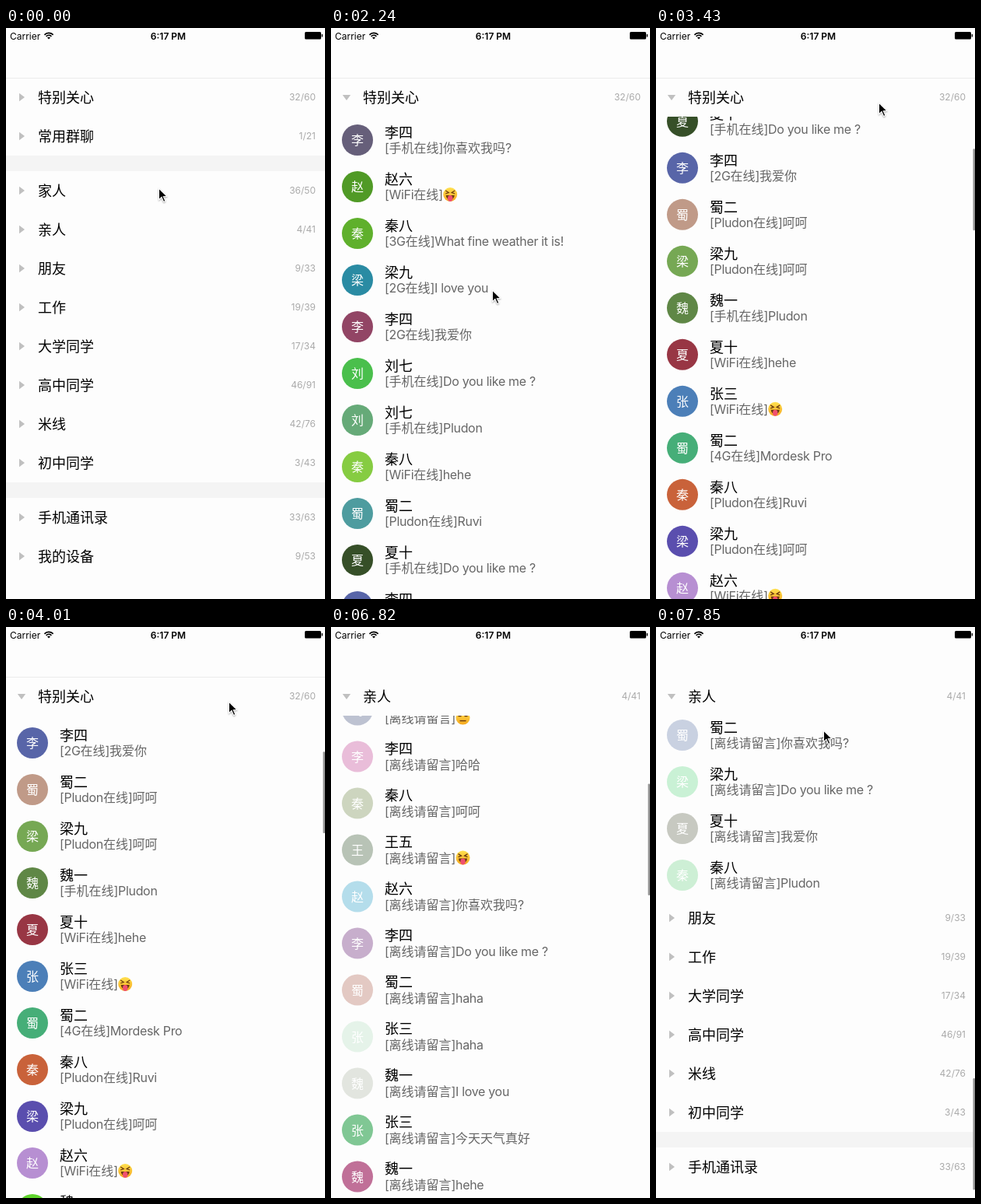
Recreate the animation shown at these times as an HTML page with a canvas. Size 410 by 734 pixels, loop 8 s.

```html
<!DOCTYPE html>
<html lang="zh-CN">
<head>
<meta charset="utf-8">
<title>Contacts</title>
<style>
html, body { margin: 0; width: 100%; height: 100%; overflow: hidden; background: #fdfdfd; }
canvas { display: block; width: 410px; height: 734px; }
</style>
</head>
<body>
<canvas id="stage"></canvas>
<script>
const W = 410, H = 734, TOP = 64, HEAD = 50, CELL = 60, LOOP = 8000;
const BG = '#fdfdfd', GAP = '#f4f4f4';
const FONT = "Inter, 'Noto Sans CJK SC', 'Noto Sans CJK', sans-serif";
const canvas = document.getElementById('stage');
const ctx = canvas.getContext('2d');
const dpr = window.devicePixelRatio || 1;
canvas.width = W * dpr;
canvas.height = H * dpr;

// name, presence ('-' is offline), message, colour; @1 and @2 are faces
const parse = s => s.trim().split('\n').map(l => l.trim().split('|'));
const starred = parse(`
  李四|手机|你喜欢我吗?|#665f7a
  赵六|WiFi|@1|#509a26
  秦八|3G|What fine weather it is!|#5fb02c
  梁九|2G|I love you|#2a8ba3
  李四|2G|我爱你|#924565
  刘七|手机|Do you like me ?|#4abf4c
  刘七|手机|Pludon|#66aa78
  秦八|WiFi|hehe|#86cc42
  蜀二|Pludon|Ruvi|#4e9c9f
  夏十|手机|Do you like me ?|#364f28
  李四|2G|我爱你|#5865a8
  蜀二|Pludon|呵呵|#c09a88
  梁九|Pludon|呵呵|#76a854
  魏一|手机|Pludon|#5f8746
  夏十|WiFi|hehe|#983644
  张三|WiFi|@1|#4c7fb8
  蜀二|4G|Mordesk Pro|#46ae78
  秦八|Pludon|Ruvi|#c9623a
  梁九|Pludon|呵呵|#5a4eae
  赵六|WiFi|@1|#b78fd2
  魏一|手机|哈哈|#5fd42c`);
const family = parse(`
  张三|2G|我爱你|#6c86c2
  梁九|WiFi|@1|#66b0c0
  王五|Pludon|呵呵|#641c7c
  李四|3G|What fine weather it is!|#3a88d2
  蜀二|-|我爱你|#6a76d8
  赵六|-|呵呵|#9862a8
  秦八|-|今天天气真好|#6f776c
  蜀二|-|@2|#5d6a8f
  李四|-|哈哈|#ca5ca2
  秦八|-|呵呵|#849861
  王五|-|@1|#526b4d
  赵六|-|你喜欢我吗?|#48accf
  李四|-|Do you like me ?|#753982
  蜀二|-|haha|#bb7a6b
  张三|-|haha|#c0e3ca
  魏一|-|I love you|#b9c0b1
  张三|-|今天天气真好|#31a552
  魏一|-|hehe|#b55786`);
const familyEnd = parse(`
  蜀二|-|你喜欢我吗?|#7a8eb6
  梁九|-|Do you like me ?|#7ade98
  夏十|-|我爱你|#757a66
  秦八|-|Pludon|#84d998`);

let seed = 7;
const rnd = n => (seed = seed * 16807 % 2147483647) % n;
const names = '魏一 蜀二 张三 李四 王五 赵六 刘七 秦八 梁九 夏十'.split(' ');
const words = ['呵呵', '哈哈', 'hehe', 'haha', '我爱你', '今天天气真好', 'I love you', '@1', '@2'];
const filler = () => [names[rnd(10)], '-', words[rnd(words.length)],
  `rgb(${40 + rnd(170)},${40 + rnd(170)},${40 + rnd(170)})`];
const fill = (rows, n, end = []) => {
  while (rows.length + end.length < n) rows.push(filler());
  return rows.concat(end);
};

const sections = [
  ['特别关心', '32/60'], ['常用群聊', '1/21', 20],
  ['家人', '36/50'], ['亲人', '4/41'], ['朋友', '9/33'], ['工作', '19/39'],
  ['大学同学', '17/34'], ['高中同学', '46/91'], ['米线', '42/76'], ['初中同学', '3/43', 20],
  ['手机通讯录', '33/63'], ['我的设备', '9/53']
].map(([title, count, gap = 0]) => ({ title, count, gap, rows: [] }));
sections[0].rows = fill(starred, 60);
sections[3].rows = fill(family, 41, familyEnd);

// --- motion ---
const clamp = v => Math.max(0, Math.min(1, v));
const ramp = (t, a, b) => clamp((t - a) / (b - a));
const smooth = k => k * k * (3 - 2 * k);
const ease = (t, a, b) => smooth(ramp(t, a, b));
const drag = (t, a, b, p) => Math.pow(ramp(t, a, b), p);
const glide = (t, a, b, tau) =>
  (1 - Math.exp(-(Math.max(a, Math.min(b, t)) - a) / tau)) / (1 - Math.exp(-(b - a) / tau));

function openness(t) {
  return [ease(t, 1350, 1640) - ease(t, 5190, 5390), 0, 0, ease(t, 5430, 5640)];
}

function scrollAt(t) {
  if (t < 5800)
    return (259 * drag(t, 2240, 2690, 1.75) + 336 * glide(t, 2690, 4010, 335)) * (1 - ease(t, 5190, 5390));
  return 480 * drag(t, 6200, 6500, 1.3) + 175 * glide(t, 6500, 7000, 240)
    + 740 * drag(t, 7000, 7250, 1.5) + 1000 * glide(t, 7250, 7850, 250);
}

const path = [
  [0, 196, 205], [300, 196, 205], [900, 215, 104], [1700, 215, 104], [2200, 207, 336],
  [2240, 207, 336], [2690, 284, 77], [2830, 287, 110], [3200, 286, 95], [4250, 286, 95],
  [4460, 275, 97], [4620, 275, 97], [4760, 240, 132], [4900, 207, 97], [5200, 207, 97],
  [5430, 166, 270], [5640, 166, 270], [5930, 165, 281], [5960, 165, 281], [6200, 190, 640],
  [6500, 205, 160], [6800, 215, 745], [7000, 215, 760], [7250, 212, 20], [7800, 215, 132], [LOOP, 215, 132]
];
function cursorAt(t) {
  const i = Math.max(1, path.findIndex(p => p[0] > t));
  const [t0, x0, y0] = path[i - 1], [t1, x1, y1] = path[i];
  const k = ease(t, t0, t1);
  let y = y0 + (y1 - y0) * k;
  if (t0 === 2240) y = y0 - scrollAt(t);
  if (t0 === 7000) y = y0 + (y1 - y0) * drag(t, t0, t1, 1.5);
  return [x0 + (x1 - x0) * k, y];
}

// --- drawing ---
function rect(x, y, w, h, color) {
  ctx.fillStyle = color;
  ctx.fillRect(x, y, w, h);
}
function disc(x, y, r, color) {
  ctx.fillStyle = color;
  ctx.beginPath();
  ctx.arc(x, y, r, 0, 7);
  ctx.fill();
}
function poly(pts, color) {
  ctx.beginPath();
  pts.forEach(([x, y]) => ctx.lineTo(x, y));
  ctx.closePath();
  ctx.fillStyle = color;
  ctx.fill();
}
function text(s, x, y, size, color, align = 'left', weight = 400) {
  ctx.font = `${weight} ${size}px ${FONT}`;
  ctx.textAlign = align;
  ctx.fillStyle = color;
  ctx.fillText(s, x, y);
}
// Latin runs are tracked a little tighter than Chinese ones
function mixed(s, x, y, size, color) {
  for (const run of s.match(/[\u3000-\u9fff]+|[^\u3000-\u9fff]+/g) || []) {
    ctx.letterSpacing = run.charCodeAt(0) < 0x3000 ? '-0.32px' : '0px';
    text(run, x, y, size, color);
    x += ctx.measureText(run).width;
  }
  ctx.letterSpacing = '0px';
  return x;
}

function line(pts, color, width) {
  ctx.beginPath();
  pts.forEach(([x, y]) => ctx.lineTo(x, y));
  ctx.strokeStyle = color;
  ctx.lineWidth = width;
  ctx.stroke();
}
function face(x, y, kind) {
  const g = ctx.createLinearGradient(0, y - 9, 0, y + 9);
  g.addColorStop(0, '#ffe04f');
  g.addColorStop(1, '#f5a81e');
  disc(x, y, 9, g);
  const ink = '#6b3a10';
  if (kind === '2') {
    line([[x - 6, y - 2], [x - 2, y - 2]], ink, 1.4);
    line([[x + 2, y - 2], [x + 6, y - 2]], ink, 1.4);
    line([[x - 4, y + 4], [x + 4, y + 4]], ink, 1.4);
    return;
  }
  for (const d of [-1, 1])
    line([[x + d * 6, y - 5], [x + d * 2, y - 2.5], [x + d * 6, y - 1]], ink, 1.3);
  ctx.fillStyle = ink;
  ctx.beginPath();
  ctx.arc(x, y + 1, 5.5, 0, Math.PI);
  ctx.fill();
  ctx.fillStyle = '#f0506e';
  ctx.beginPath();
  ctx.ellipse(x, y + 5, 3.2, 4, 0, 0, 7);
  ctx.fill();
}

function drawCell([name, net, msg, color], y, alpha, fade) {
  const c = y + CELL / 2;
  ctx.globalAlpha = alpha * (1 - 0.6 * fade);
  disc(34, c, 20, color);
  ctx.globalAlpha = alpha;
  text(name[0], 34, c + 6, 16, '#fff', 'center');
  text(name, 69, c - 3.2, 18, '#000');
  const status = net === '-' ? '[离线请留言]' : `[${net}在线]`;
  const isFace = msg[0] === '@';
  const x = mixed(status + (isFace ? '' : msg), 69, c + 16, 16, '#666');
  if (isFace) face(x + 9.5, c + 10, msg[1]);
  ctx.globalAlpha = 1;
}

function drawHeader(s, y, open, first) {
  const c = y + HEAD / 2;
  rect(0, y, W, HEAD, BG);
  if (first) rect(0, y, W, 1, '#ececec');
  ctx.save();
  ctx.translate(20, c);
  ctx.rotate(open * Math.PI / 2);
  poly([[-3, -5.2], [4, 0], [-3, 5.2]], '#c0c0c0');
  ctx.restore();
  text(s.title, 41, c + 6.8, 18, '#000');
  text(s.count, 398, c + 4.4, 12, '#aaa', 'right');
}

function drawList(t) {
  const open = openness(t), off = scrollAt(t);
  let y = TOP - off, total = 0;
  sections.forEach((s, i) => {
    const e = open[i] || 0, full = s.rows.length * CELL, h = full * e;
    if (e > 0) {
      ctx.save();
      ctx.beginPath();
      ctx.rect(0, y + HEAD, W, h);
      ctx.clip();
      s.rows.forEach((row, k) => {
        const cy = y + HEAD + k * CELL;
        if (cy > H || cy < TOP - CELL) return;
        const travel = off - Math.max(0, k * CELL - 450);
        drawCell(row, cy, e, row[1] === '-' ? ramp(travel, 20, 170) : 0);
      });
      ctx.restore();
    }
    const end = y + HEAD + h;
    const hy = Math.min(Math.max(y, TOP), end - HEAD);
    if (hy < H && hy > TOP - HEAD) drawHeader(s, hy, e, i === 0);
    if (s.gap) rect(0, end, W, s.gap, GAP);
    y = end + s.gap;
    total += HEAD + h + s.gap;
  });
  rect(0, 0, W, TOP, BG);

  const shown = ramp(t, 2300, 2390) - ramp(t, 4160, 4420) + ramp(t, 6180, 6260);
  if (shown > 0) {
    const view = H - TOP, track = 664, len = track * view / total;
    ctx.globalAlpha = shown;
    ctx.fillStyle = '#929292';
    ctx.beginPath();
    ctx.roundRect(407.5, 67 + (track - len) * off / (total - view), 2.5, len, 1.2);
    ctx.fill();
    ctx.globalAlpha = 1;
  }
}

function drawStatus() {
  text('Carrier', 5, 14.5, 12, '#000');
  text('6:17 PM', 208.5, 14.5, 12, '#000', 'center', 600);
  ctx.strokeStyle = '#000';
  ctx.lineWidth = 1.7;
  for (const r of [4.6, 7.6]) {
    ctx.beginPath();
    ctx.arc(55, 14, r, -Math.PI * 0.76, -Math.PI * 0.24);
    ctx.stroke();
  }
  poly([[55, 14.5], [53, 12.2], [55, 11.4], [57, 12.2]], '#000');
  ctx.fillStyle = '#000';
  ctx.beginPath();
  ctx.roundRect(384, 5, 21, 9.5, 1.5);
  ctx.fill();
  rect(405.7, 8, 1.3, 3.5, '#000');
}

function drawCursor([x, y]) {
  ctx.save();
  ctx.translate(x, y);
  ctx.shadowColor = 'rgba(0,0,0,.35)';
  ctx.shadowBlur = 2 * dpr;
  ctx.shadowOffsetY = dpr;
  poly([[0, 0], [0, 17], [3.8, 13.4], [6.4, 19.2], [9.4, 18], [6.9, 12.2], [12, 12]], '#fff');
  ctx.shadowColor = 'transparent';
  poly([[1, 2.4], [1, 14.6], [4.1, 11.6], [6.9, 17.8], [8.2, 17.2], [5.5, 11.2], [9.7, 11.1]], '#000');
  ctx.restore();
}

function frame(now) {
  const t = now % LOOP;
  ctx.setTransform(dpr, 0, 0, dpr, 0, 0);
  rect(0, 0, W, H, BG);
  drawList(t);
  drawStatus();
  drawCursor(cursorAt(t));
}

const start = performance.now();
function tick() {
  frame(performance.now() - start);
  requestAnimationFrame(tick);
}
tick();
</script>
</body>
</html>
```
